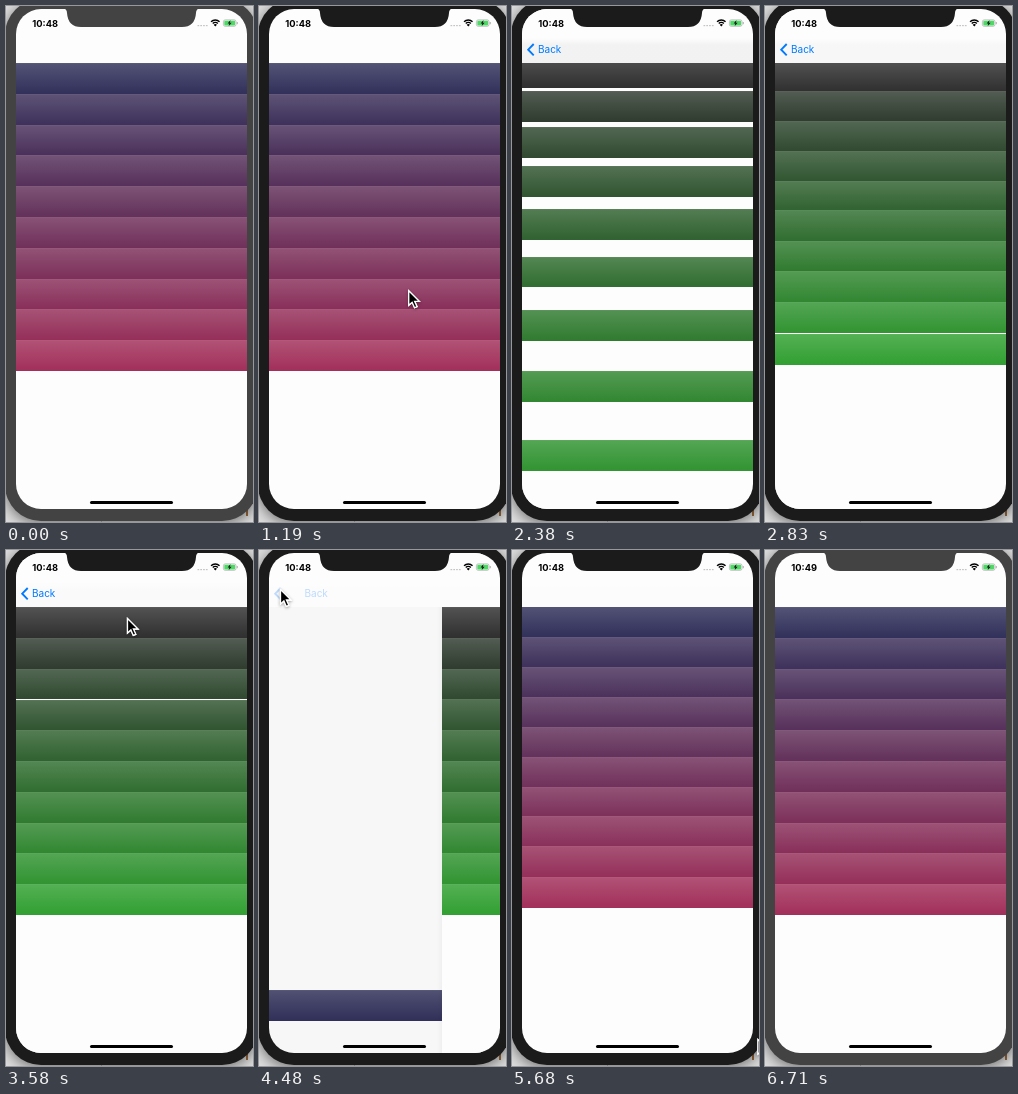
Write an HTML page with a canvas that moves like this. It is 247x516 px and loops after 6.77 s.

```html
<!DOCTYPE html>
<html lang="en">
<head>
<meta charset="utf-8">
<title>Spring list transition</title>
<style>
  html, body { margin: 0; width: 100%; height: 100%; overflow: hidden; background: #dedede; }
  canvas { display: block; width: 247px; height: 516px; }
</style>
</head>
<body>
<canvas></canvas>
<script>
const W = 247, H = 516, LOOP = 6770, STEP = 149.1;
const FOCUS = 600, BLUR = 6710;
const PRESS = 1490, PUSH = 1626, BACK_PRESS = 4180, POP = 4335, MINUTE = 5980;
const SCREEN = { x: 10, y: 3, w: 231, h: 500 };
const LIST_TOP = 57, ROW = 30.8, ROWS = 10;
const PURPLE = [[49, 49, 91], [162, 48, 90]];
const GREEN = [[48, 48, 48], [50, 160, 50]];

const canvas = document.querySelector('canvas');
const ctx = canvas.getContext('2d');
const ratio = window.devicePixelRatio || 1;
canvas.width = W * ratio;
canvas.height = H * ratio;

// Remaining distance of the under-damped row spring (damping ratio 0.8).
function rowRest(sec) {
  if (sec <= 0) return 1;
  const a = 3.66 * sec;
  return Math.exp(-a * 4 / 3) * (Math.cos(a) + 4 / 3 * Math.sin(a));
}

// Remaining distance of the critically damped page slide.
function slideRest(sec) {
  const a = 19 * Math.max(0, sec);
  return (1 + a) * Math.exp(-a);
}

function fillRect(x, y, w, h, color) {
  ctx.fillStyle = color;
  ctx.fillRect(x, y, w, h);
}

function roundRect(x, y, w, h, r, color) {
  ctx.beginPath();
  ctx.roundRect(x, y, w, h, r);
  ctx.fillStyle = color;
  ctx.fill();
}

function text(str, x, y, font, color) {
  ctx.font = font + ' Inter, Roboto, sans-serif';
  ctx.fillStyle = color;
  ctx.fillText(str, x, y);
}

function drawRow(x, y, color) {
  const top = Math.round(y), height = Math.round(y + ROW) - top;
  fillRect(x, top, SCREEN.w, height, color);
  const shine = ctx.createLinearGradient(0, top, 0, top + height);
  shine.addColorStop(0, 'rgba(255,255,255,.21)');
  shine.addColorStop(0.05, 'rgba(255,255,255,.16)');
  shine.addColorStop(0.9, 'rgba(255,255,255,.01)');
  shine.addColorStop(1, 'rgba(255,255,255,0)');
  fillRect(x, top, SCREEN.w, height, shine);
}

function drawList(x, [from, to], sec, selected) {
  fillRect(x, SCREEN.y, SCREEN.w, SCREEN.h, '#fdfdfd');
  ctx.save();
  ctx.beginPath();
  ctx.rect(x, LIST_TOP, SCREEN.w, H);
  ctx.clip();
  for (let i = 0; i < ROWS; i++) {
    const mix = from.map((c, k) => Math.round(c + (to[k] - c) * i / (ROWS - 1)));
    const y = LIST_TOP + i * ROW + SCREEN.h * rowRest(sec - i * 0.05);
    drawRow(x, y, i === selected ? '#d1d1d1' : `rgb(${mix})`);
  }
  ctx.restore();
}

function drawNav(open, overshoot, pressed) {
  const alpha = 0.032 * Math.min(1, Math.max(0, overshoot / 5)) + 0.01 * open;
  const tint = ctx.createLinearGradient(0, 32, 0, 39);
  tint.addColorStop(0, 'rgba(0,0,0,0)');
  tint.addColorStop(1, `rgba(0,0,0,${alpha})`);
  fillRect(SCREEN.x, 32, SCREEN.w, LIST_TOP - 32, tint);

  ctx.globalAlpha = open * (pressed ? 0.25 : 1);
  ctx.beginPath();
  ctx.moveTo(21.7, 38);
  ctx.lineTo(16.2, 43.7);
  ctx.lineTo(21.7, 49.4);
  ctx.lineWidth = 1.9;
  ctx.strokeStyle = '#007aff';
  ctx.stroke();
  text('Back', 26 + 26 * (1 - open), 47.4, '400 10px', '#007aff');
  ctx.globalAlpha = 1;
}

function drawStatus(clock) {
  text(clock, 26.3, 20.5, '700 9.3px', '#000');
  for (let i = 0; i < 4; i++) fillRect(191.5 + i * 2.8, 19, 1.7, 1.2, '#c4c4c4');

  ctx.strokeStyle = '#000';
  ctx.lineWidth = 1.4;
  for (const r of [3.6, 6]) {
    ctx.beginPath();
    ctx.arc(209.3, 20, r, -Math.PI * 0.75, -Math.PI * 0.25);
    ctx.stroke();
  }
  ctx.beginPath();
  ctx.moveTo(209.3, 20.4);
  ctx.arc(209.3, 20.4, 2.3, -Math.PI * 0.75, -Math.PI * 0.25);
  ctx.fillStyle = '#000';
  ctx.fill();

  ctx.beginPath();
  ctx.roundRect(217.4, 13.9, 12.6, 6.4, 1.8);
  ctx.lineWidth = 0.6;
  ctx.strokeStyle = '#999';
  ctx.stroke();
  roundRect(218.3, 14.8, 10.8, 4.6, 1, '#4cd964');
  fillRect(230.8, 16, 0.8, 2.2, '#999');
  polygon([[224.6, 14], [221.6, 17.5], [223.4, 17.5], [222.6, 20.2], [225.6, 16.7], [223.8, 16.7]]);
  ctx.fillStyle = '#111';
  ctx.fill();
}

function polygon(points) {
  ctx.beginPath();
  points.forEach(([x, y]) => ctx.lineTo(x, y));
  ctx.closePath();
}

function drawBody(color) {
  fillRect(0, 0, W, H, '#dedede');
  fillRect(95, 513, 1, 3, '#b5b5b5');
  fillRect(240, 503, 2, 7, '#9a6a3c');
  ctx.save();
  ctx.shadowColor = 'rgba(0,0,0,.5)';
  ctx.shadowBlur = 14 * ratio;
  ctx.shadowOffsetY = 3 * ratio;
  roundRect(-1, -7, 253, 522, 36, color);
  ctx.restore();
}

function drawNotch(color) {
  ctx.beginPath();
  ctx.moveTo(57, 2);
  ctx.quadraticCurveTo(61, 3, 61, 7);
  ctx.quadraticCurveTo(62, 21, 75, 21);
  ctx.lineTo(176, 21);
  ctx.quadraticCurveTo(189, 21, 190, 7);
  ctx.quadraticCurveTo(190, 3, 194, 2);
  ctx.closePath();
  ctx.fillStyle = color;
  ctx.fill();
}

// Pointer keys: time, x, y.
const TRAILS = [
  [[750, 248, 440], [1350, 130, 254], [1600, 130, 254]],
  [[3100, 130, 254], [3580, 121, 68], [3880, 21, 39], [4480, 21, 39],
   [5070, 245, 443], [5530, 245, 488], [6270, 250, 500]]
];

function drawPointer(t) {
  const trail = TRAILS.find(k => t >= k[0][0] && t < k[k.length - 1][0]);
  if (!trail) return;
  const n = trail.findIndex(k => k[0] > t);
  const [a, b] = [trail[n - 1], trail[n]];
  const p = (t - a[0]) / (b[0] - a[0]);
  const e = p * p * (3 - 2 * p);
  ctx.save();
  ctx.translate(a[1] + (b[1] - a[1]) * e, a[2] + (b[2] - a[2]) * e);
  polygon([[0.5, 0.5], [0.5, 15], [3.9, 11.9], [6.3, 17.4], [8.8, 16.3], [6.4, 11], [11, 11]]);
  ctx.shadowColor = 'rgba(0,0,0,.45)';
  ctx.shadowBlur = 3 * ratio;
  ctx.shadowOffsetY = ratio;
  ctx.lineWidth = 1.3;
  ctx.strokeStyle = '#fff';
  ctx.stroke();
  ctx.shadowColor = 'transparent';
  ctx.fillStyle = '#000';
  ctx.fill();
  ctx.stroke();
  ctx.restore();
}

function drawPages(t) {
  const popped = t >= POP;
  const open = popped ? slideRest((t - POP) / 1000) : 1 - slideRest((t - PUSH) / 1000);
  const purpleAge = popped ? (t - POP) / 1000 : 99;
  const greenAge = popped ? 99 : (t - PUSH) / 1000;
  const selected = t >= PRESS && !popped ? 6 : -1;

  drawList(SCREEN.x - 0.3 * SCREEN.w * open, PURPLE, purpleAge, selected);
  fillRect(SCREEN.x, LIST_TOP, SCREEN.w, H, `rgba(0,0,0,${0.1 * open})`);
  if (open > 0.001) {
    const x = Math.round(SCREEN.x + SCREEN.w * (1 - open));
    const edge = ctx.createLinearGradient(x - 5, 0, x, 0);
    edge.addColorStop(0, 'rgba(0,0,0,0)');
    edge.addColorStop(1, `rgba(0,0,0,${0.04 * (1 - open)})`);
    fillRect(x - 5, LIST_TOP, 5, H, edge);
    drawList(x, GREEN, greenAge, -1);
  }
  const overshoot = -SCREEN.h * rowRest(popped ? purpleAge : greenAge);
  drawNav(open, overshoot, t >= BACK_PRESS && !popped);
}

function draw(now) {
  const raw = now % LOOP;
  const t = raw < FOCUS ? 0 : FOCUS + STEP * Math.floor((raw - FOCUS + 10) / STEP);
  const bezel = raw < FOCUS || raw >= BLUR ? '#434343' : '#1b1b1b';

  ctx.setTransform(ratio, 0, 0, ratio, 0, 0);
  drawBody(bezel);
  ctx.save();
  ctx.beginPath();
  ctx.roundRect(SCREEN.x, SCREEN.y, SCREEN.w, SCREEN.h, 25);
  ctx.clip();
  drawPages(t);
  drawStatus(t >= MINUTE ? '10:49' : '10:48');
  roundRect(84, 495, 83, 3, 1.5, '#000');
  ctx.restore();
  drawNotch(bezel);
  drawPointer(t);
}

const start = performance.now();
function tick() {
  draw(performance.now() - start);
  requestAnimationFrame(tick);
}
tick();
</script>
</body>
</html>
```
